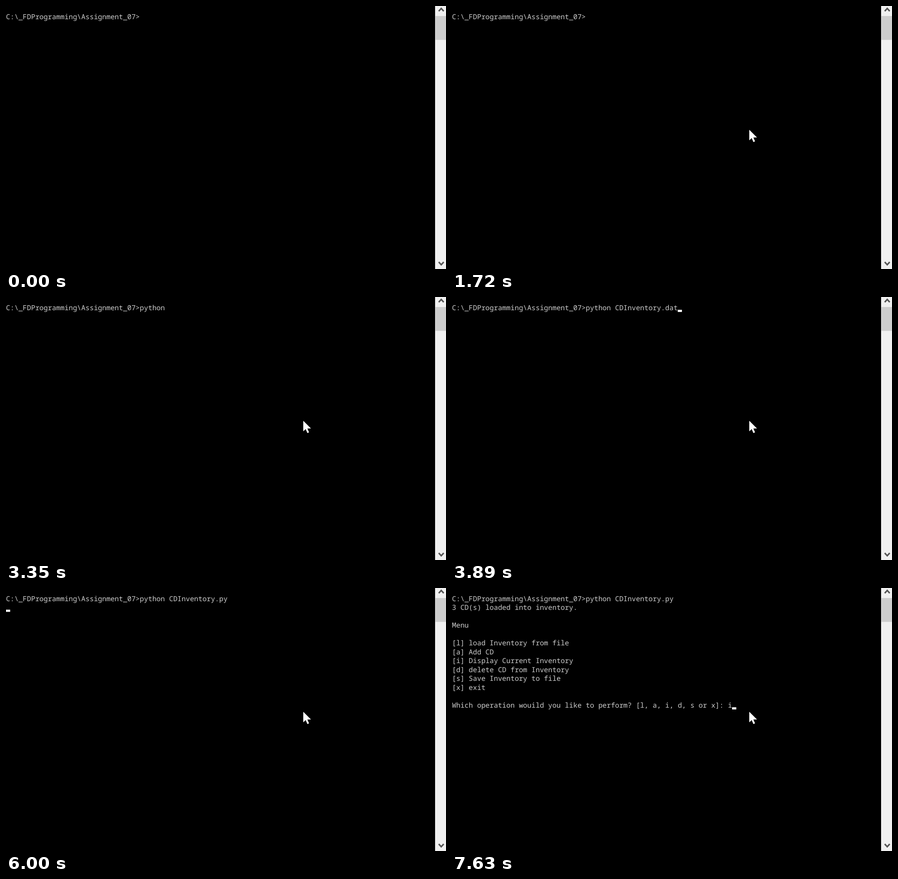
Animation, 968 px wide and 578 px high, one loop 8000 ms. Source, as an HTML page:

```html
<!DOCTYPE html>
<html lang="en">
<head>
<meta charset="utf-8">
<title>Console session</title>
<style>
  html, body { margin: 0; width: 100%; height: 100%; overflow: hidden; background: #000; }
  svg { display: block; }
  text {
    font: 15.33px "Noto Sans Mono", "DejaVu Sans Mono", monospace;
    fill: #ccc;
    white-space: pre;
    text-rendering: geometricPrecision;
    font-variant-ligatures: none;
  }
  .chevron { fill: none; stroke: #555; stroke-width: 3.2; }
</style>
</head>
<body>
<svg width="968" height="578" viewBox="0 0 968 578">
  <rect width="968" height="578"/>
  <g id="rows"></g>
  <rect id="caret" width="9.2" height="4.8" fill="#fff"/>
  <rect x="944" width="24" height="578" fill="#f0f0f0"/>
  <rect x="944.5" y="22" width="23.5" height="52.5" fill="#cdcdcd"/>
  <path class="chevron" d="M952 11.3 L957.5 5.3 L963 11.3"/>
  <path class="chevron" d="M952 562.7 L957.5 568.7 L963 562.7"/>
  <path id="pointer" fill="#fff" d="M0 0 V23.3 L5.3 18.3 L9 27 L12.7 25.4 L9.1 17 H17 Z"/>
  <circle id="click" cx="653" cy="269.5" r="19.5" fill="#fff700" fill-opacity=".48"/>
</svg>
<script>
const DURATION = 8000;
const CELL = 9.197, LINE = 19.5, BASELINE = 28.9, CARET_TOP = 28.1;
const PROMPT = 'C:\\_FDProgramming\\Assignment_07>';
const QUESTION = 'Which operation wouild you like to perform? [l, a, i, d, s or x]: ';
const OUTPUT = [
  '3 CD(s) loaded into inventory.', '', 'Menu', '',
  '[l] load Inventory from file',
  '[a] Add CD',
  '[i] Display Current Inventory',
  '[d] delete CD from Inventory',
  '[s] Save Inventory to file',
  '[x] exit', ''
];

// time, typed command, caret visible
const TYPING = [
  [0, '', false], [1260, '', true], [1720, '', false],
  [1795, 'p', true], [1870, 'py', true], [2100, 'pyt', true],
  [2190, 'pyth', true], [2340, 'pytho', true], [2570, 'python', true],
  [2740, 'python', false], [2800, 'python ', true], [3350, 'python ', false],
  [3520, 'python C', true], [3750, 'python CD', true],
  [3890, 'python CDInventory.dat', true], [4680, 'python CDInventory.da', true],
  [4830, 'python CDInventory.d', true], [4910, 'python CDInventory.d', false],
  [4990, 'python CDInventory.', true], [5460, 'python CDInventory.', false],
  [5610, 'python CDInventory.p', true], [5840, 'python CDInventory.py', true]
];
// time, answer, caret visible
const ANSWER = [[6070, '', true], [7080, '', false], [7540, '', true], [7630, 'i', true]];
const POINTER = [[230, 727, 419], [310, 692, 346], [390, 663, 290], [470, 654, 272]];
const ENTER = 6000, CLICK_START = 700, CLICK_END = 940;

const byId = id => document.getElementById(id);
const caret = byId('caret'), pointer = byId('pointer'), click = byId('click');
const rows = Array.from({ length: OUTPUT.length + 2 }, (_, i) => {
  const row = document.createElementNS('http://www.w3.org/2000/svg', 'text');
  row.setAttribute('y', BASELINE + i * LINE);
  return byId('rows').appendChild(row);
});

const stepAt = (steps, t) => steps.findLast(step => step[0] <= t);
const show = (el, on) => el.setAttribute('visibility', on ? 'visible' : 'hidden');

function screenAt(t) {
  const [, command, blink] = stepAt(TYPING, t);
  const lines = [PROMPT + command];
  const answer = stepAt(ANSWER, t);
  if (answer) {
    lines.push(...OUTPUT, QUESTION + answer[1]);
    return { lines, caretOn: answer[2] };
  }
  if (t >= ENTER) lines.push('');
  return { lines, caretOn: blink };
}

function render(t) {
  const { lines, caretOn } = screenAt(t);
  rows.forEach((row, i) => {
    const line = lines[i] || '';
    if (row.textContent !== line) row.textContent = line;
  });
  const last = lines.length - 1;
  caret.setAttribute('x', lines[last].length * CELL);
  caret.setAttribute('y', CARET_TOP + last * LINE);
  show(caret, caretOn);

  const spot = stepAt(POINTER, t);
  show(pointer, spot);
  if (spot) pointer.setAttribute('transform', `translate(${spot[1]} ${spot[2]})`);
  show(click, t >= CLICK_START && t < CLICK_END);
}

const start = performance.now();
function tick() {
  render((performance.now() - start) % DURATION);
  requestAnimationFrame(tick);
}
tick();
</script>
</body>
</html>
```
